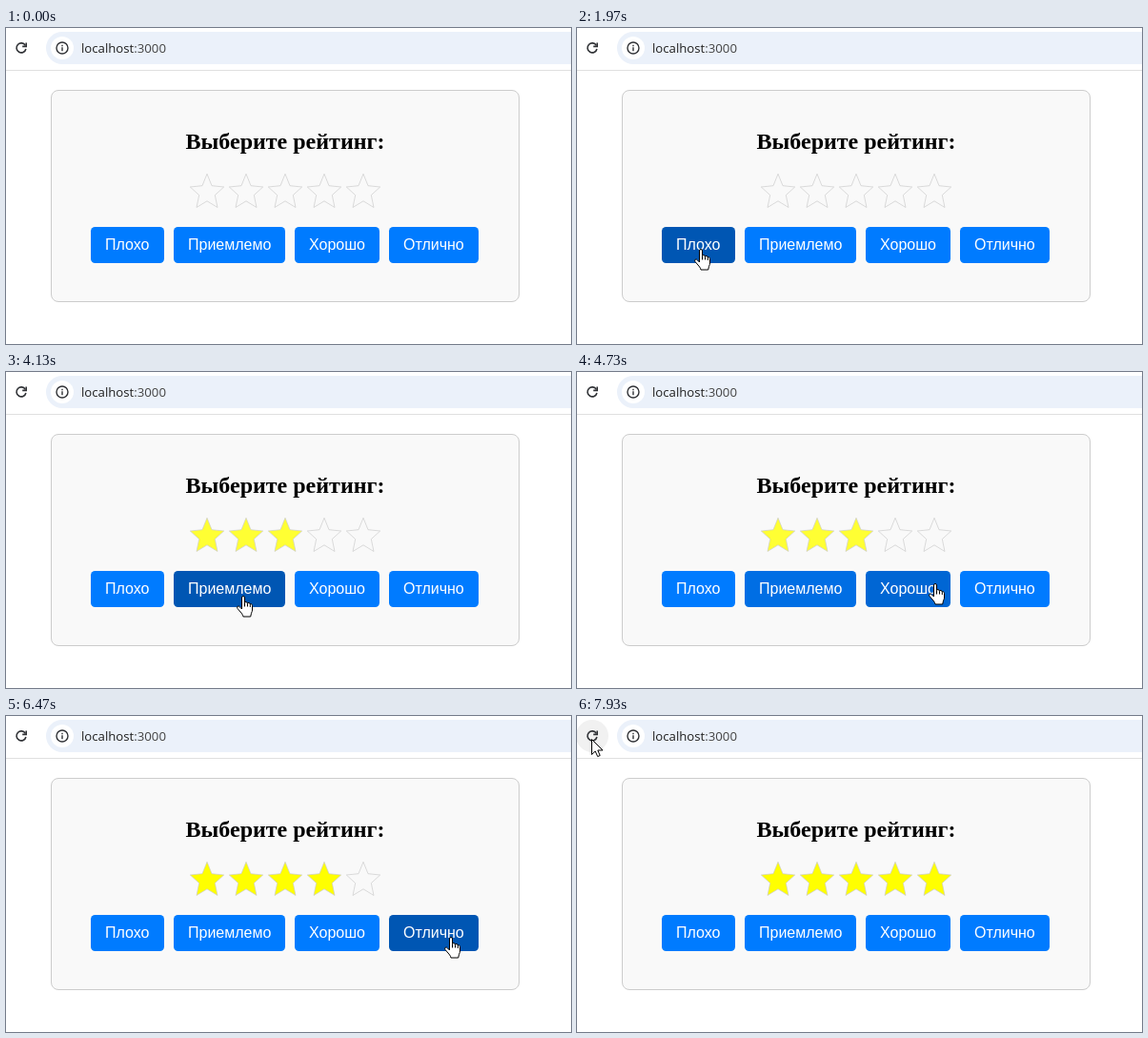
Write an HTML page that moves like this. It is 593x332 px and loops after 8 s.

```html
<!DOCTYPE html>
<html lang="ru">
<head>
<meta charset="utf-8">
<title>Рейтинг</title>
<style>
html, body { margin: 0; width: 100%; height: 100%; overflow: hidden; background: #fff; }
svg { display: block; width: 593px; height: 332px; }
.url { font: 13.2px "Open Sans", "Noto Sans", sans-serif; fill: #1f1f1f; }
.title { font: bold 24px "Liberation Serif", serif; text-anchor: middle; }
.label { font: 16px "Liberation Sans", sans-serif; fill: #fff; }
.star { stroke: #ccc; stroke-width: .7; }
.line { fill: none; stroke: #303236; stroke-width: 1.6; }
.cursor { fill: #fff; stroke: #000; stroke-linejoin: round; }
</style>
</head>
<body>
<svg id="stage" viewBox="0 0 593 332">
  <rect width="593" height="332" fill="#fff"/>
  <circle id="halo" cx="16" cy="21" r="17" fill="#f1f1f1"/>
  <path class="line" d="M20.3 18.3A5 5 0 1 0 20.9 22"/>
  <path class="line" d="M21.2 15.4V19.4H17.2"/>
  <path d="M593 4H59a17 17 0 0 0 0 34H593Z" fill="#ebf1fa"/>
  <circle cx="59" cy="21" r="12" fill="#fff"/>
  <circle class="line" cx="59" cy="21" r="6" style="stroke-width:1.4"/>
  <path class="line" d="M59 20.3V24.2M59 17.7V19.2" style="stroke-width:1.4"/>
  <text class="url" x="79" y="26">localhost<tspan fill="#444">:3000</tspan></text>
  <rect y="44" width="593" height="1" fill="#e0e0e0"/>
  <rect x="47.5" y="65.5" width="491" height="222" rx="7.5" fill="#f9f9f9" stroke="#ccc"/>
  <text class="title" x="293" y="127">Выберите рейтинг:</text>
  <g id="stars"></g>
  <g id="buttons"></g>
  <g id="arrow" class="cursor">
    <path d="M.5 .5V16.5L4.2 13L6.7 18.6L9.2 17.5L6.8 12H12Z"/>
  </g>
  <g id="hand" class="cursor">
    <path d="M-.5 14V2Q-.5 .5 1 .5T2.5 2V7.5Q2.8 6.5 4 6.6T5.5 8.2Q5.8 7.3 7 7.5T8.3 9.2Q8.6 8.5 9.5 8.8T10.5 10.5V15Q10.5 16.5 9.5 18.3L8.7 22H1L.5 20.5Q0 19.2 -2 17L-5 13.5Q-6 11.8 -4.8 11.2T-2.5 12Z"/>
    <path fill="none" d="M2.5 7.5V11.5M5.5 8.2V11.5M8.3 9.2V12"/>
  </g>
</svg>
<script>
const LOOP = 8000, FADE = 200;
const $ = id => document.getElementById(id);

function add(parent, tag, attrs, text = '') {
  const el = document.createElementNS('http://www.w3.org/2000/svg', tag);
  for (const k in attrs) el.setAttribute(k, attrs[k]);
  el.textContent = text;
  parent.append(el);
  return el;
}

// label, left, width, hover start, hover end
const buttons = [
  ['Плохо', 89, 77, 1640, 3190],
  ['Приемлемо', 176, 117, 3196, 4655],
  ['Хорошо', 303, 89, 4664, 6085],
  ['Отлично', 402, 94, 6098, 7346]
].map(([label, x, width, enter, leave]) => {
  const rect = add($('buttons'), 'rect', { x, y: 209, width, height: 38, rx: 4.5 });
  add($('buttons'), 'text', { class: 'label', x: x + 15, y: 233 }, label);
  return { rect, enter, leave };
});

const half = [[0, 153.3], [5, 165.7], [17.7, 167], [8.3, 175.6], [11, 188.5], [0, 181.8]];
const outline = [...half, ...half.slice(1, 5).reverse().map(([x, y]) => [-x, y])];
const stars = [211, 252, 293, 334, 375].map(cx => add($('stars'), 'polygon', {
  class: 'star', points: outline.map(([x, y]) => [cx + x, y]).join(' ')
}));

// time, number of stars, colour
const ratings = [
  [0, 0, 'none'], [2570, 2, '#ffff66'], [4130, 3, '#ffff33'],
  [5530, 4, '#ffff00'], [6900, 5, '#ffff00']
];

const linear = u => u;
const easeIn = u => u ** 3;
const easeOut = u => 1 - (1 - u) ** 3;
const easeInOut = u => u < .5 ? 4 * u ** 3 : 1 - 4 * (1 - u) ** 3;
const jump = () => 1;

// start, end, x, y, easing
const moves = [
  [1400, 1640, 105, 212, linear],
  [1640, 1960, 129, 232, easeOut],
  [3115, 3290, 248, 235, easeInOut],
  [4565, 4745, 375, 222, easeInOut],
  [4760, 5070, 378, 229, easeInOut],
  [6020, 6210, 465, 231, easeInOut],
  [6470, 6471, 466, 232, jump],
  [7260, 7400, 181, 108, easeIn],
  [7400, 7640, 22, 3, easeOut],
  [7650, 7920, 15, 24, easeInOut]
];

const clamp = u => Math.max(0, Math.min(1, u));

// CSS "ease": cubic-bezier(.25, .1, .25, 1)
function ease(u) {
  if (u <= 0 || u >= 1) return clamp(u);
  let lo = 0, hi = 1, s = .5;
  for (let i = 0; i < 20; i++) {
    s = (lo + hi) / 2;
    const x = .75 * s * (1 - s) + s ** 3;
    if (x < u) lo = s; else hi = s;
  }
  return .3 * s * (1 - s) ** 2 + 3 * s * s * (1 - s) + s ** 3;
}

function pointer(t) {
  let x = 10, y = 118;
  for (const [start, end, tx, ty, curve] of moves) {
    if (t < start) break;
    const k = curve(clamp((t - start) / (end - start)));
    x += (tx - x) * k;
    y += (ty - y) * k;
  }
  return [x, y];
}

function draw(t) {
  let over = false;
  for (const { rect, enter, leave } of buttons) {
    const k = ease((t - enter) / FADE) - ease((t - leave) / FADE);
    rect.setAttribute('fill', `rgb(0,${Math.round(123 - 37 * k)},${Math.round(255 - 76 * k)})`);
    over = over || (t >= enter && t < leave);
  }

  const [, count, colour] = ratings.filter(r => t >= r[0]).pop();
  stars.forEach((star, i) => star.setAttribute('fill', i < count ? colour : 'none'));

  const [x, y] = pointer(t).map(Math.round);
  for (const id of ['arrow', 'hand']) {
    const shown = t >= 1400 && (id === 'hand') === over;
    $(id).setAttribute('visibility', shown ? 'visible' : 'hidden');
    $(id).setAttribute('transform', `translate(${x} ${y})`);
  }
  $('halo').setAttribute('opacity', ease((t - 7540) / 200));
}

let begin;
function tick(now) {
  begin ??= now;
  draw((now - begin) % LOOP);
  requestAnimationFrame(tick);
}
draw(0);
requestAnimationFrame(tick);
</script>
</body>
</html>
```
